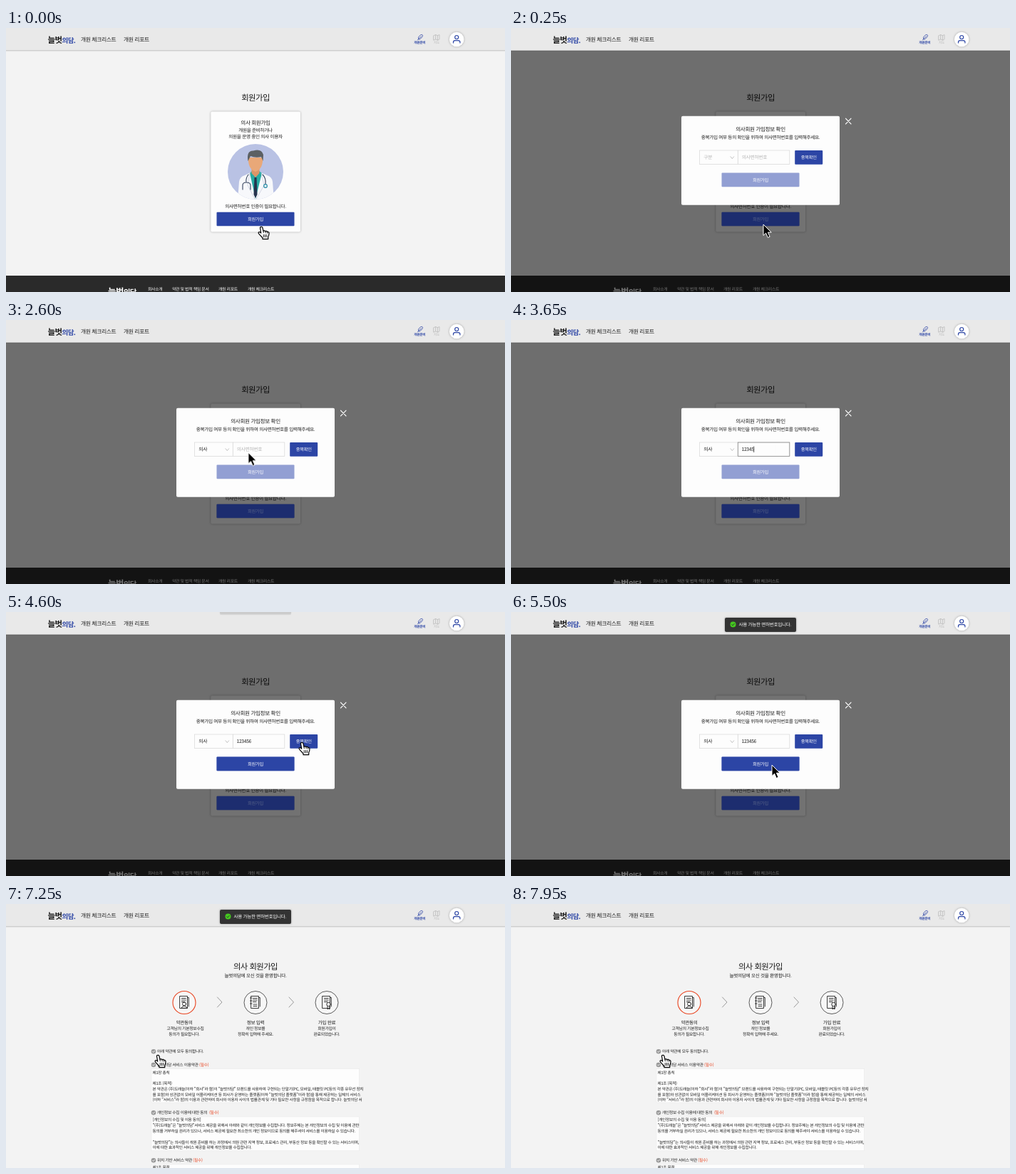
Recreate the animation shown at these times as an HTML page. Size 700 by 371 pixels, loop 8000 ms.

```html
<!DOCTYPE html>
<html lang="ko">
<head>
<meta charset="utf-8">
<title>의사 회원가입</title>
<style>
html, body { margin: 0; width: 100%; height: 100%; overflow: hidden; background: #f3f3f3; }
svg.stage { display: block; width: 100vw; height: 100vh; }
text {
  font-family: "Noto Sans CJK KR", "Noto Sans CJK", "Noto Sans CJK JP", sans-serif;
  font-size: 6.65px; letter-spacing: -.05em; fill: #1c1c1c;
  text-rendering: geometricPrecision; white-space: pre;
}
.mid { text-anchor: middle; }
.nav { font-size: 7.8px; }
.title { font-size: 11.4px; font-weight: 500; }
.head { font-size: 7.6px; font-weight: 500; }
.strong { font-weight: 500; }
.small { font-size: 5.85px; }
.label { font-size: 5.75px; font-weight: 500; }
.terms text { font-size: 5.7px; }
.btn { font-size: 6.3px; font-weight: 500; fill: #fff; }
.field { font-size: 6.8px; }
.hint { fill: #b5b5b5; }
.tiny { font-size: 4.7px; font-weight: 700; }
.must { fill: #e8431f; }
.foot text { fill: #fff; font-size: 5.9px; font-weight: 500; }
.line { fill: none; stroke-linecap: round; stroke-linejoin: round; }
.soft { filter: drop-shadow(0 .5px 1.5px rgba(0,0,0,.3)); }

/* One shared 8 s timeline: 1% is 80 ms. */
.cut { animation: 8s step-end infinite; }
.page-one { animation-name: pageOne; }
.page-two { animation-name: pageTwo; }
.list { animation-name: list; }
.unpicked { animation-name: unpicked; }
.picked { animation-name: picked; }
.focus { animation-name: focus; }
.caret { animation-name: caret; }
.empty { animation-name: empty; }
.typed { animation-name: typed; }
.ready { animation-name: ready; }
.hand { animation-name: hand; }
.arrow { animation-name: arrow; }
.dialog { animation: dialog 8s linear infinite; }
.panel { animation: panel 8s ease-out infinite; transform-origin: 350px 186px; }
.toast { animation: toast 8s ease-out infinite; }
.cursor { animation: cursor 8s ease-in-out infinite; }

@keyframes pageOne { 0% { opacity: 1 } 71.8%, 100% { opacity: 0 } }
@keyframes pageTwo { 0% { opacity: 0 } 71.8%, 100% { opacity: 1 } }
@keyframes dialog { 0%, .6% { opacity: 0 } 2.8%, 71.79% { opacity: 1 } 71.8%, 100% { opacity: 0 } }
@keyframes panel { 0%, .6% { transform: scale(.8) } 2.8%, 100% { transform: none } }
@keyframes list { 0% { opacity: 0 } 16.2% { opacity: 1 } 26.5%, 100% { opacity: 0 } }
@keyframes unpicked { 0% { opacity: 1 } 26.3%, 100% { opacity: 0 } }
@keyframes picked { 0% { opacity: 0 } 26.3%, 100% { opacity: 1 } }
@keyframes focus { 0% { opacity: 0 } 34.5% { opacity: 1 } 56.9%, 100% { opacity: 0 } }
@keyframes caret { 0% { opacity: 0 } 34.5% { opacity: 1 } 48.8% { opacity: 0 } 53% { opacity: 1 } 56.9%, 100% { opacity: 0 } }
@keyframes empty { 0% { opacity: 1 } 36.9%, 100% { opacity: 0 } }
@keyframes typed {
  0% { transform: none }
  36.9% { transform: translateX(3.43px) }
  38.9% { transform: translateX(6.87px) }
  40.9% { transform: translateX(10.3px) }
  42.9% { transform: translateX(13.74px) }
  44.9% { transform: translateX(17.17px) }
  46.9%, 100% { transform: translateX(20.6px) }
}
@keyframes ready { 0% { opacity: 0 } 57.4%, 100% { opacity: 1 } }
@keyframes toast {
  0%, 57.2% { transform: translateY(-29px); opacity: 0 }
  60.4%, 94.6% { transform: none; opacity: 1 }
  98.4%, 100% { transform: translateY(-29px); opacity: 0 }
}
@keyframes hand {
  0% { opacity: 1 } 1.2% { opacity: 0 } 13.1% { opacity: 1 } 29.1% { opacity: 0 }
  53.1% { opacity: 1 } 61.9% { opacity: 0 } 69.5% { opacity: 1 } 71.8% { opacity: 0 } 77.5%, 100% { opacity: 1 }
}
@keyframes arrow {
  0% { opacity: 0 } 1.2% { opacity: 1 } 13.1% { opacity: 0 } 29.1% { opacity: 1 } 36.3% { opacity: 0 }
  49.4% { opacity: 1 } 53.1% { opacity: 0 } 61.9% { opacity: 1 } 69.5% { opacity: 0 } 71.8% { opacity: 1 } 77.5%, 100% { opacity: 0 }
}
@keyframes cursor {
  0% { transform: translate(358px, 279px) }
  2.5%, 7.5% { transform: translate(354px, 276px) }
  14.4%, 17.5% { transform: translate(290px, 183px) }
  21.9%, 28% { transform: translate(294px, 207px) }
  33.8%, 49.4% { transform: translate(345px, 184px) }
  54.4%, 60% { transform: translate(415px, 183px) }
  66.3%, 72.5% { transform: translate(366px, 215px) }
  78%, 81.3% { transform: translate(250px, 217px) }
  90%, 100% { transform: translate(213px, 212px) }
}
</style>
</head>
<body>
<svg class="stage" viewBox="0 0 700 371" preserveAspectRatio="none">
  <defs>
    <g id="tick">
      <circle r="3.3" fill="#999"/>
      <path class="line" d="M-1.5 0 -.4 1.2 1.6 -1.1" stroke="#fff" stroke-width=".8"/>
    </g>
    <g id="sheet" class="line" stroke="#222" stroke-width=".9">
      <path d="M-6 -8.5H4.5V8.5H-6ZM4.5 -6.5H6.3V6M-3.5 -5.5H2.2M-3.5 -3H2.2M-3.5 -.5H1"/>
    </g>
    <path id="next" class="line" d="M-3 -7 3.5 0 -3 7" stroke="#999" stroke-width="1"/>
    <clipPath id="disc"><circle cx="350" cy="202" r="39"/></clipPath>
  </defs>

  <rect width="700" height="371" fill="#f3f3f3"/>

  <g class="cut page-one">
    <text class="title mid" x="350" y="102.3">회원가입</text>
    <rect class="soft" x="287.3" y="117.5" width="125.7" height="169" rx="2" fill="#fdfdfd"/>
    <text class="head mid" x="350" y="136">의사 회원가입</text>
    <text class="mid" x="350" y="146">개원을 준비하거나</text>
    <text class="mid" x="350" y="155">의원을 운영 중인 의사 이용자</text>
    <g clip-path="url(#disc)">
      <rect x="311" y="163" width="78" height="78" fill="#b9c2e4"/>
      <path d="M325 242 327 216Q328 209 335 207L343 203H357L366 207Q373 209 374 216L376 242Z" fill="#f7f8fb"/>
      <path d="M342 204 350 240 359 204 355 201H345Z" fill="#27aaa2"/>
      <path d="M344.500 197H355.500V204L350 210 344.500 204Z" fill="#dc9568"/>
      <path d="M348.500 210H351.500L352.500 234 350 239 347.500 234Z" fill="#26334d"/>
      <path d="M340 182Q339 198 350 202 361 198 360 182Z" fill="#e9a878"/>
      <path d="M339.500 187Q337 172 347 172.500 358 169 361 178L360.500 187 358 181Q350 183 343 180Z" fill="#5c6063"/>
      <g class="line">
        <path d="M342 204 339 221 350 242M358 204 362 221 350 242" stroke="#c9cfdd" stroke-width=".8"/>
        <path d="M340 206Q336 211 337 217M332 227V221Q332 217 337 217 343 217 343 221V227M360 206Q365 211 364 219" stroke="#34425c" stroke-width="1.100"/>
        <circle cx="364" cy="222" r="2.300" fill="#fff" stroke="#2489a5" stroke-width="1.200"/>
      </g>
    </g>
    <text class="mid" x="350" y="253.300">의사면허번호 인증이 필요합니다.</text>
    <rect x="295.500" y="258.700" width="109" height="19.600" rx="1" fill="#2c45a5"/>
    <text class="btn mid" x="350" y="270.800">회원가입</text>
    <g class="foot">
      <rect y="348" width="700" height="23" fill="#2a2a2a"/>
      <text x="143" y="374.500" style="font-size:12.500px;font-weight:700">늘벗<tspan font-size="10.500">의담.</tspan></text>
      <text x="199" y="368.500">회사소개</text>
      <text x="233" y="368.500">약관 및 법적 책임 문서</text>
      <text x="298" y="368.500">개원 리포트</text>
      <text x="339" y="368.500">개원 체크리스트</text>
    </g>
  </g>

  <g class="cut page-two">
    <text class="title mid" x="350" y="92.200">의사 회원가입</text>
    <text class="mid" x="350" y="103.300">늘벗의담에 오신 것을 환영합니다.</text>
    <g fill="#f7f7f7" stroke="#333" stroke-width=".8">
      <circle cx="250" cy="138.500" r="16" stroke="#e8431f" stroke-width="1.100"/>
      <circle cx="350" cy="138.500" r="16"/>
      <circle cx="450" cy="138.500" r="16"/>
    </g>
    <use href="#sheet" x="250" y="138"/>
    <use href="#sheet" x="350" y="138"/>
    <use href="#sheet" x="450" y="138"/>
    <g class="line" stroke="#222" stroke-width=".9">
      <circle cx="250" cy="140.500" r="2.500" fill="#f7f7f7"/>
      <path d="M246 146Q250 140 254 146Z" fill="#f7f7f7"/>
      <path d="M342.500 132H345M342.500 136H345M342.500 140H345M347 141H352M347 143.500H352"/>
      <circle cx="452.500" cy="141" r="2.700" fill="#f7f7f7"/>
      <path d="M451 143.500V148L452.500 146.800 454 148V143.500"/>
    </g>
    <use href="#next" x="299.500" y="138"/>
    <use href="#next" x="400" y="138"/>
    <g class="mid">
      <text class="strong" x="250" y="168.600">약관동의</text>
      <text class="strong" x="350" y="168.600">정보 입력</text>
      <text class="strong" x="450" y="168.600">가입 완료</text>
      <text class="small" x="251.500" y="176.700">고객님의 기본정보수집</text>
      <text class="small" x="250" y="184.500">동의가 필요합니다.</text>
      <text class="small" x="350" y="176.700">개인 정보를</text>
      <text class="small" x="350" y="184.500">정확히 입력해 주세요.</text>
      <text class="small" x="450" y="176.700">회원가입이</text>
      <text class="small" x="450" y="184.500">완료되었습니다.</text>
    </g>
    <use href="#tick" x="207" y="207.300"/>
    <use href="#tick" x="207" y="226"/>
    <use href="#tick" x="207" y="293.300"/>
    <use href="#tick" x="207" y="360.300"/>
    <text class="label" x="212" y="209.300">아래 약관에 모두 동의합니다.</text>
    <text class="label" x="212" y="228">늘벗의담 서비스 이용약관 <tspan class="must">(필수)</tspan></text>
    <text class="label" x="212" y="295.200">개인정보 수집 이용에 대한 동의  <tspan class="must">(필수)</tspan></text>
    <text class="label" x="212" y="362.200">위치 기반 서비스 약관 <tspan class="must">(필수)</tspan></text>
    <g fill="#fdfdfd" stroke="#e6e6e6" stroke-width=".5">
      <rect x="204" y="231.700" width="291.500" height="47.300"/>
      <rect x="204" y="299" width="291.500" height="47.800"/>
      <rect x="204" y="366" width="291.500" height="47"/>
    </g>
    <g class="terms">
      <text x="205.500" y="238.500">제1장 총칙</text>
      <text x="205.500" y="254">제1조 (목적)</text>
      <text x="205.500" y="262">본 약관은 (주)도래늘(이하 "회사"라 함)이 "늘벗의담" 브랜드를 사용하여 구현되는 단말기(PC, 모바일, 태블릿 PC등의 각종 유무선 장치</text>
      <text x="205.500" y="269.700">를 포함)와 상관없이 모바일 어플리케이션 등 회사가 운영하는 플랫폼(이하 "늘벗의담 플랫폼"이라 함)을 통해 제공하는 일체의 서비스</text>
      <text x="205.500" y="277.300">(이하 "서비스"라 함)의 이용과 관련하여 회사와 이용자 사이의 법률관계 및 기타 필요한 사항을 규정함을 목적으로 합니다. 늘벗의담 서</text>
      <text x="205.500" y="305.300">[개인정보의 수집 및 이용 동의]</text>
      <text x="205.500" y="313.100">"(주)도래늘"은 "늘벗의담"서비스 제공을 위해서 아래와 같이 개인정보를 수집합니다. 정보주체는 본 개인정보의 수집 및 이용에 관한</text>
      <text x="205.500" y="320.900">동의를 거부하실 권리가 있으나, 서비스 제공에 필요한 최소한의 개인 정보이므로 동의를 해주셔야 서비스를 이용하실 수 있습니다.</text>
      <text x="205.500" y="336.600">"늘벗의담"는 의사들이 개원 준비를 하는 과정에서 의원 관련 지역 정보, 프로세스 관리, 부동산 정보 등을 확인할 수 있는 서비스이며,</text>
      <text x="205.500" y="344.400">이에 대한 효과적인 서비스 제공을 위해 개인정보를 수집합니다.</text>
      <text x="205.500" y="372.300">제1조 목적</text>
    </g>
  </g>

  <g class="dialog">
    <rect width="700" height="371" fill="#000" opacity=".55"/>
    <rect x="295.500" y="258.700" width="109" height="19.600" rx="1" fill="#2c45a5" opacity=".4"/>
    <g class="panel">
      <path class="line" d="M469.500 127.200 477 134.800M477 127.200 469.500 134.800" stroke="#fff" stroke-width="1.200"/>
      <rect x="239" y="123.700" width="222" height="125" rx="2" fill="#fdfdfd"/>
      <text class="head mid" x="350" y="145.300">의사회원 가입정보 확인</text>
      <text class="mid" x="350" y="156.300">중복가입 여부 등의 확인을 위하여 의사면허번호를 입력해주세요.</text>
      <g fill="#fdfdfd" stroke="#d6d6d6" stroke-width=".7">
        <rect x="264.500" y="172" width="53.800" height="19.500"/>
        <rect x="318.300" y="172" width="72.500" height="19.500"/>
      </g>
      <rect class="cut focus" x="318.300" y="172" width="72.500" height="19.500" fill="none" stroke="#8c8c8c" stroke-width=".8"/>
      <text class="field hint cut unpicked" x="270.300" y="183.700">구분</text>
      <text class="field cut picked" x="270.300" y="183.700">의사</text>
      <path class="line" d="M308 180.800 310.300 183.600 312.600 180.800" stroke="#aaa" stroke-width=".7"/>
      <text class="field" x="323.500" y="184.200">123456</text>
      <g class="cut typed">
        <rect x="323.400" y="176" width="30" height="12" fill="#fdfdfd"/>
        <path class="cut caret" d="M323.500 177.500V186" stroke="#111" stroke-width=".7"/>
      </g>
      <text class="field hint cut empty" x="323.700" y="184.200">의사면허번호</text>
      <rect x="398.200" y="172" width="39" height="19.700" rx="1" fill="#2c45a5"/>
      <text class="btn mid" x="417.700" y="184.100">중복확인</text>
      <rect x="295.500" y="203.600" width="109" height="19.700" rx="1" fill="#929fd3"/>
      <rect class="cut ready" x="295.500" y="203.600" width="109" height="19.700" rx="1" fill="#2c45a5"/>
      <text class="btn mid" x="350" y="215.600">회원가입</text>
      <g class="cut list">
        <rect class="soft" x="264.500" y="193.500" width="53.800" height="50.500" rx="1" fill="#fff"/>
        <rect x="264.500" y="195.500" width="53.800" height="15.500" fill="#f0f0f0"/>
        <text class="field" x="270.300" y="205.700">의사</text>
        <text class="field" x="270.300" y="221">치과의사</text>
        <text class="field" x="270.300" y="236.500">기타</text>
      </g>
    </g>
  </g>

  <g>
    <rect y="31" width="700" height="2" fill="#000" opacity=".07"/>
    <rect width="700" height="31.500" fill="#e9e9e9"/>
    <rect y="31.200" width="700" height=".7" fill="#c4c4c4"/>
    <text x="58.500" y="20.500" style="font-size:11.500px;font-weight:700">늘벗<tspan font-size="9.500" fill="#2c45a5">의담.</tspan></text>
    <text class="nav" x="105" y="18.900">개원 체크리스트</text>
    <text class="nav" x="165" y="18.900">개원 리포트</text>
    <g class="line" stroke="#2c45a5" stroke-width=".8">
      <path d="M577.500 16.800 582.500 11.800M578.700 15.500V12.600L581.600 9.800Q584.200 8.600 584.500 10.200 584.700 11.600 583.500 12.900L581 15.500Z"/>
      <path d="M600 10.700 602.600 9.500 605.400 10.700 608 9.500V15.800L605.400 17 602.600 15.800 600 17ZM602.600 9.500V15.800M605.400 10.700V17" stroke="#bbb"/>
    </g>
    <text class="tiny mid" x="580.300" y="22.300" style="fill:#2c45a5">개원준비</text>
    <text class="tiny mid" x="604" y="22.300" style="fill:#bbb;font-weight:400">지도</text>
    <circle class="soft" cx="632.200" cy="16" r="10.300" fill="#fff"/>
    <g class="line" stroke="#2c45a5" stroke-width="1.200">
      <circle cx="632.200" cy="13" r="2.500"/>
      <path d="M627.500 20.900V19.800Q627.500 17.600 629.800 17.600H634.600Q636.900 17.600 636.900 19.800V20.900"/>
    </g>
  </g>

  <g class="toast">
    <rect class="soft" x="300" y="8" width="100" height="20" rx="2" fill="#333"/>
    <circle cx="311.500" cy="17.600" r="4" fill="#45c81f"/>
    <path class="line" d="M309.700 17.700 311 19 313.400 16.300" stroke="#333" stroke-width=".9"/>
    <text x="319.500" y="20" style="fill:#fff;font-size:6.600px">사용 가능한 면허번호입니다.</text>
  </g>

  <g class="cursor">
    <g class="cut arrow">
      <path d="M0 0V15.500L3.600 12.200 6.300 18.500 9.100 17.300 6.400 11.200H11.200Z" fill="#000" stroke="#fff" stroke-width="1" stroke-linejoin="round"/>
    </g>
    <g class="cut hand">
      <path d="M-1.500 2Q-1.600 .4 .2 .4 1.700 .4 2 2L3 6.300Q4.800 5.200 6 6.700 7.700 5.900 8.600 7.400 10.700 7 11 9.200 11.100 12.300 9.700 14.500V17.700H2V16L-2.500 11.200Q-4.700 8.800 -3.500 7.900 -2.300 7.100 -.3 9.200Z" fill="#fff" stroke="#000" stroke-width="1.200" stroke-linejoin="round"/>
      <path class="line" d="M3 6.300 3.300 8.800M6 6.700 6.200 9M8.600 7.400V9.300M3.300 11.500V15M5.500 11.500V15M7.700 11.500V15" stroke="#000" stroke-width=".9"/>
    </g>
  </g>
</svg>
</body>
</html>
```
